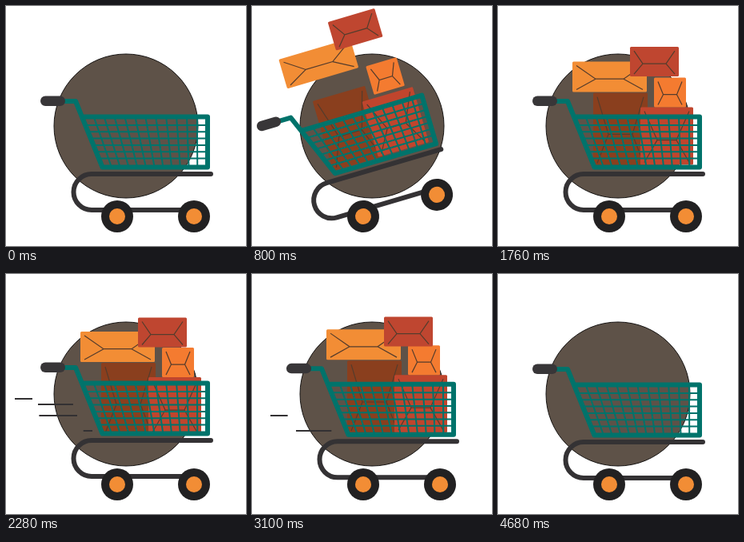
Write an HTML page that moves like this. It is 300x300 px and loops after 4700 ms.

```html
<!DOCTYPE html>
<html lang="en">
<head>
<meta charset="utf-8">
<title>Shopping cart</title>
<style>
  html, body { margin: 0; width: 100%; height: 100%; overflow: hidden; background: #fff; }
  svg { display: block; width: 100vw; height: 100vh; }
</style>
</head>
<body>
<svg viewBox="0 0 300 300" fill="none">
  <circle cx="150" cy="150" r="90" fill="#5e5248" stroke="#151312" stroke-width="1"/>
  <g id="lines" stroke="#333133" stroke-width="2"></g>
  <g id="cart">
    <g id="boxes"></g>
    <g id="frame">
      <path d="M256 210H107a22.5 22.5 0 0 0 0 45H235" stroke="#343234" stroke-width="6" stroke-linecap="round"/>
      <path id="grid" stroke="#00736b" stroke-width="2"/>
      <path d="M70 119H87L120.5 201.5H252V138.500H96" stroke="#00736b" stroke-width="6" stroke-linejoin="round"/>
      <rect x="43" y="112.500" width="31" height="12.500" rx="6.200" fill="#383638"/>
    </g>
    <g id="wheels"></g>
  </g>
</svg>
<script>
const LOOP = 4700;
const byId = id => document.getElementById(id);

function add(parent, tag, attrs) {
  const el = document.createElementNS('http://www.w3.org/2000/svg', tag);
  for (const k in attrs) el.setAttribute(k, attrs[k]);
  return parent.appendChild(el);
}

const clamp = u => Math.max(0, Math.min(1, u));
const ease = u => (1 - Math.cos(Math.PI * u)) / 2;

// Eased value at t from [time, value] steps.
function at(steps, t) {
  let [t0, v0] = steps[0];
  for (const [t1, v1] of steps) {
    if (t < t1) return t <= t0 ? v0 : v0 + (v1 - v0) * ease((t - t0) / (t1 - t0));
    [t0, v0] = [t1, v1];
  }
  return v0;
}

// Basket mesh
let mesh = '';
for (let i = 1; i < 12; i++) mesh += `M${97 + i * 12.9} 139L${121 + i * 10.75} 201`;
for (let i = 0; i < 6; i++) {
  const y = 149 + i * 8.3;
  mesh += `M${97 + (y - 138) * .39} ${y}H251`;
}
byId('grid').setAttribute('d', mesh);

for (const cx of [139, 235]) {
  add(byId('wheels'), 'circle', { cx, cy: 263, r: 20, fill: '#222122' });
  add(byId('wheels'), 'circle', { cx, cy: 263, r: 10, fill: '#f28d35' });
}

// Parcels: position, size, colour, inset of the flap, throw height, backward slide
const boxes = [
  { x: 119, y: 111, w: 68, h: 91, fill: '#8a3f1e', inset: 19, lift: 4, dx: -16.5, dy: -3 },
  { x: 178, y: 129, w: 66, h: 72, fill: '#c0452d', inset: 21, lift: 4, dx: -16.5, dy: -7 },
  { x: 93, y: 72, w: 93, h: 38, fill: '#f28d35', inset: 29, lift: 27, dx: -31.5, dy: 2 },
  { x: 195, y: 92, w: 40, h: 37, fill: '#f47b30', inset: 11.5, lift: 8, dx: -22, dy: -8.5 },
  { x: 165, y: 54.5, w: 61, h: 37, fill: '#bf4630', inset: 16, lift: 37, dx: -40.5, dy: -5.5, loose: true }
];
for (const b of boxes) {
  const { x, y, w, h, inset } = b;
  const l = x + inset, r = x + w - inset, m = y + h * .57, e = 5;
  b.el = add(byId('boxes'), 'g', {});
  add(b.el, 'rect', { x, y, width: w, height: h, rx: 1.5, fill: b.fill });
  add(b.el, 'path', {
    d: `M${x + e} ${y + e}L${l} ${m}H${r}L${x + w - e} ${y + e}M${x + e} ${y + h - 3}L${l} ${m}M${r} ${m}L${x + w - e} ${y + h - 3}`,
    stroke: '#553c2c', 'stroke-width': 1.2
  });
}

// Wind lines: row, left end, right end, delay
const winds = [[156, 11, 78, 0], [163, 40, 87, 37], [177, 23, 89, 58], [196, 55, 108, 89]]
  .map(([y, left, right, delay]) => ({ left, right, delay, el: add(byId('lines'), 'line', { y1: y, y2: y }) }));
const GUST = 381, SWEEP = 61;

const tilt = [[0, 0], [800, -16.4], [1080, -16.4], [1450, 0], [1560, -1], [1680, 0]];
const toss = [[380, 0], [800, 1], [1240, 0]];
const slide = [[1080, 0], [1320, 1], [1640, 0]];
const size = [[130, 0], [480, 1], [4217, 1], [4537, 0]];

function gustTime(t) {
  if (t < 1798) return t - 1288;
  return (t - 1798) % GUST;
}

// 0 to 2 and back once per period
const wave = (t, period) => 1 - Math.cos(2 * Math.PI * (t - 2280) / period);

function draw(t) {
  byId('cart').setAttribute('transform', `rotate(${at(tilt, t)} 139 263)`);

  // The frame rattles against the parcels.
  const rattle = t > 1804 && t < 4090 ? 2 - wave(t, GUST / 2) : 0;
  byId('frame').setAttribute('transform', `translate(0 ${-rattle})`);

  const s = at(size, t);
  byId('boxes').setAttribute('transform', `translate(172 200) scale(${s}) translate(-172 -200)`);
  byId('boxes').style.display = s > .01 ? '' : 'none';

  const up = at(toss, t), back = at(slide, t);
  const shaking = t > 1709 && t < 4185;
  for (const b of boxes) {
    const hop = shaking ? 2.1 * wave(t, b.loose ? GUST : GUST / 2) : 0;
    b.el.setAttribute('transform', `translate(${b.dx * back} ${b.dy * back - b.lift * up - hop})`);
  }

  const g = gustTime(t);
  for (const w of winds) {
    const u = (g - w.delay) / SWEEP, span = w.right - w.left;
    w.el.setAttribute('x1', w.right - span * clamp(u));
    w.el.setAttribute('x2', w.right - span * clamp(u - 1));
    w.el.style.display = u > 0 && u < 2 ? '' : 'none';
  }
}

const start = performance.now();
function tick() {
  draw((performance.now() - start) % LOOP);
  requestAnimationFrame(tick);
}
tick();
</script>
</body>
</html>
```
